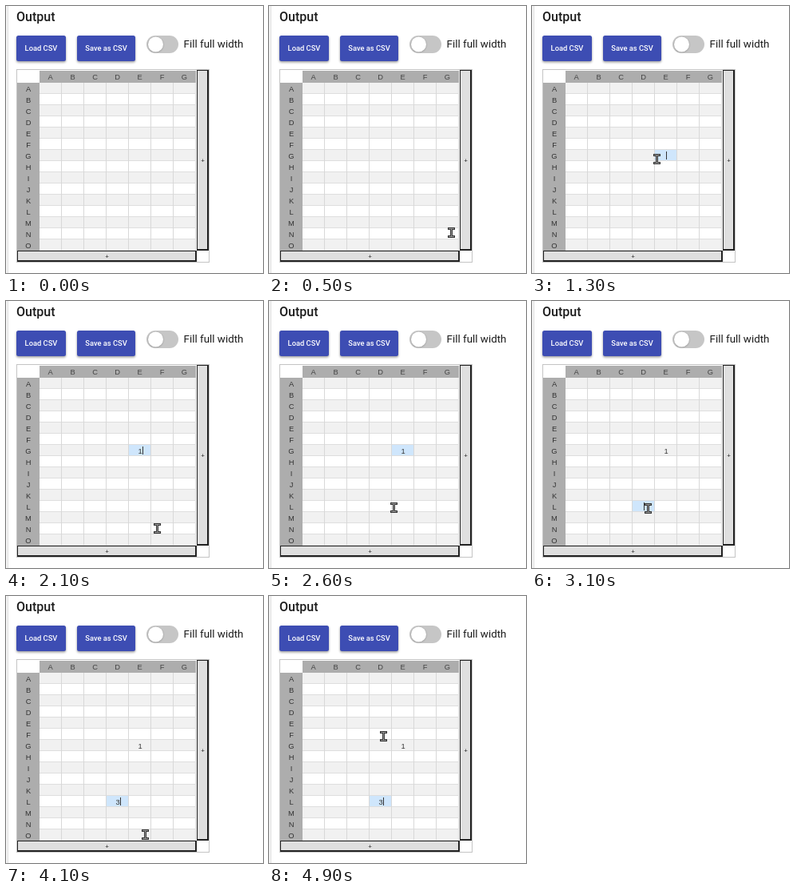
These frames come from a looping animation (322x334 px, 5000 ms). An HTML page with a canvas:

```html
<!DOCTYPE html>
<html lang="en">
<head>
<meta charset="utf-8">
<title>CSV table editor</title>
<style>
html, body { margin: 0; width: 100%; height: 100%; overflow: hidden; background: #fff; }
canvas { display: block; }
</style>
</head>
<body>
<canvas id="stage" width="322" height="334"></canvas>
<script>
const ctx = document.getElementById('stage').getContext('2d');
const UI = 'Roboto, sans-serif', CELL = '"Liberation Sans", Arial, sans-serif';
const LOOP = 5000, STEP = 100;
const COLS = 7, ROWS = 15, CW = 28, RH = 14, X0 = 42, Y0 = 96;
const X1 = X0 + COLS * CW, Y1 = Y0 + ROWS * RH;

// pointer path: time, x, y
const path = [
  [500, 228, 283], [700, 209, 230], [1000, 176, 199], [1200, 159, 190],
  [1300, 156, 191], [1500, 157, 193], [1800, 171, 238], [2100, 189, 284],
  [2200, 191, 286], [2400, 176, 259], [2700, 146, 257], [2900, 145, 259],
  [3100, 145, 259], [3300, 150, 261], [3600, 172, 271], [3900, 181, 298],
  [4100, 174, 298], [4200, 165, 257], [4500, 153, 215], [4800, 145, 182],
  [4900, 143, 175]
];

// click and key times for each edited cell
const edits = [
  { col: 4, row: 6, click: 1200, key: 1900, end: 2900, text: '1' },
  { col: 3, row: 11, click: 2900, key: 3900, end: LOOP, text: '3' }
];

function rect(x, y, w, h, color) {
  ctx.fillStyle = color;
  ctx.fillRect(x, y, w, h);
}

function round(x, y, w, h, r, color) {
  ctx.fillStyle = color;
  ctx.beginPath();
  ctx.roundRect(x, y, w, h, r);
  ctx.fill();
}

function text(s, x, y, font, color, align = 'left') {
  ctx.font = font;
  ctx.fillStyle = color;
  ctx.textAlign = align;
  ctx.fillText(s, x, y);
}

function shadow(color, blur, dy) {
  ctx.shadowColor = color;
  ctx.shadowBlur = blur;
  ctx.shadowOffsetY = dy;
}

function button(x, w, label) {
  shadow('rgba(0,0,0,.4)', 3, 1.5);
  round(x, 37, w, 32, 2.5, '#3d4db3');
  shadow('transparent', 0, 0);
  text(label, x + w / 2, 55.5, '500 9.33px ' + UI, '#fff', 'center');
}

function addBar(x, y, w, h) {
  rect(x, y, w, h, '#222');
  rect(x + 1, y + 1, w - 3, h - 3, '#dfdfdf');
  text('+', x + w / 2, y + h / 2 + 3, '8px ' + CELL, '#222', 'center');
}

function drawPage() {
  rect(0, 0, 322, 334, '#fff');
  rect(0, 0, 3, 334, '#f4f4f4');
  rect(2, 0, 1, 334, '#e2e2e2');
  text('Output', 13, 19, '500 16px ' + UI, '#1c1c1c');
  button(13, 62, 'Load CSV');
  button(89, 73, 'Save as CSV');
  round(176, 37, 40, 22, 11, '#c6c6c6');
  shadow('rgba(0,0,0,.3)', 2, 0.5);
  round(178, 38.5, 19, 19, 9.5, '#fff');
  shadow('transparent', 0, 0);
  text('Fill full width', 222.5, 52, '13.4px ' + UI, '#1c1c1c');
}

function drawTable() {
  rect(13, 79, 242, 242, '#c4c4c4');
  rect(14, 80, 240, 240, '#fff');
  rect(X0, 81, X1 - X0, Y0 - 81, '#adadad');
  rect(14, Y0, CW, Y1 - Y0, '#adadad');
  const font = '9.33px ' + CELL;
  for (let r = 0; r < ROWS; r++) {
    const y = Y0 + r * RH;
    rect(X0, y, X1 - X0, RH, r % 2 ? '#fff' : '#f1f1f1');
    rect(X0, y + RH - 1, X1 - X0, 1, '#dedede');
    text(String.fromCharCode(65 + r), 28, y + 10.5, font, '#333', 'center');
  }
  for (let c = 0; c < COLS; c++) {
    const x = X0 + c * CW;
    rect(x + CW - 1, Y0, 1, Y1 - Y0, '#d8d8d8');
    text(String.fromCharCode(65 + c), x + 13.5, 91.5, font, '#444', 'center');
  }
  addBar(239, 80, 15, 226);
  addBar(14, 306, 225, 14);
}

function drawEdit(e, t) {
  if (t < e.click) return;
  const x = X0 + e.col * CW, y = Y0 + e.row * RH;
  const typed = t >= e.key, active = t < e.end;
  if (active) rect(x, y, CW - 1, RH - 1, '#cfe6fc');
  if (typed) text(e.text, x + 14, y + 10.5, '9.33px ' + CELL, '#333', 'center');
  const since = t - (typed ? e.key : e.click);
  if (active && since % 1000 < 500) rect(x + (typed ? 17 : 14), y + 2, 1, 10, '#333');
}

function drawPointer(t) {
  const i = path.findIndex(p => p[0] > t);
  if (i === 0) return;
  const a = path.at(i < 0 ? -1 : i - 1), b = i < 0 ? a : path[i];
  const k = a === b ? 0 : (t - a[0]) / (b[0] - a[0]);
  const x = Math.round(a[1] + (b[1] - a[1]) * k);
  const y = Math.round(a[2] + (b[2] - a[2]) * k);
  rect(x - 4, y - 6, 9, 3, '#333');
  rect(x - 4, y + 4, 9, 3, '#333');
  rect(x - 1, y - 5, 3, 11, '#333');
  rect(x - 3, y - 5, 7, 1, '#999');
  rect(x - 3, y + 5, 7, 1, '#999');
  rect(x, y - 5, 1, 11, '#999');
}

function frame(now) {
  const t = Math.floor(now % LOOP / STEP) * STEP;
  drawPage();
  drawTable();
  edits.forEach(e => drawEdit(e, t));
  drawPointer(t);
  requestAnimationFrame(frame);
}
frame(0);
</script>
</body>
</html>
```
